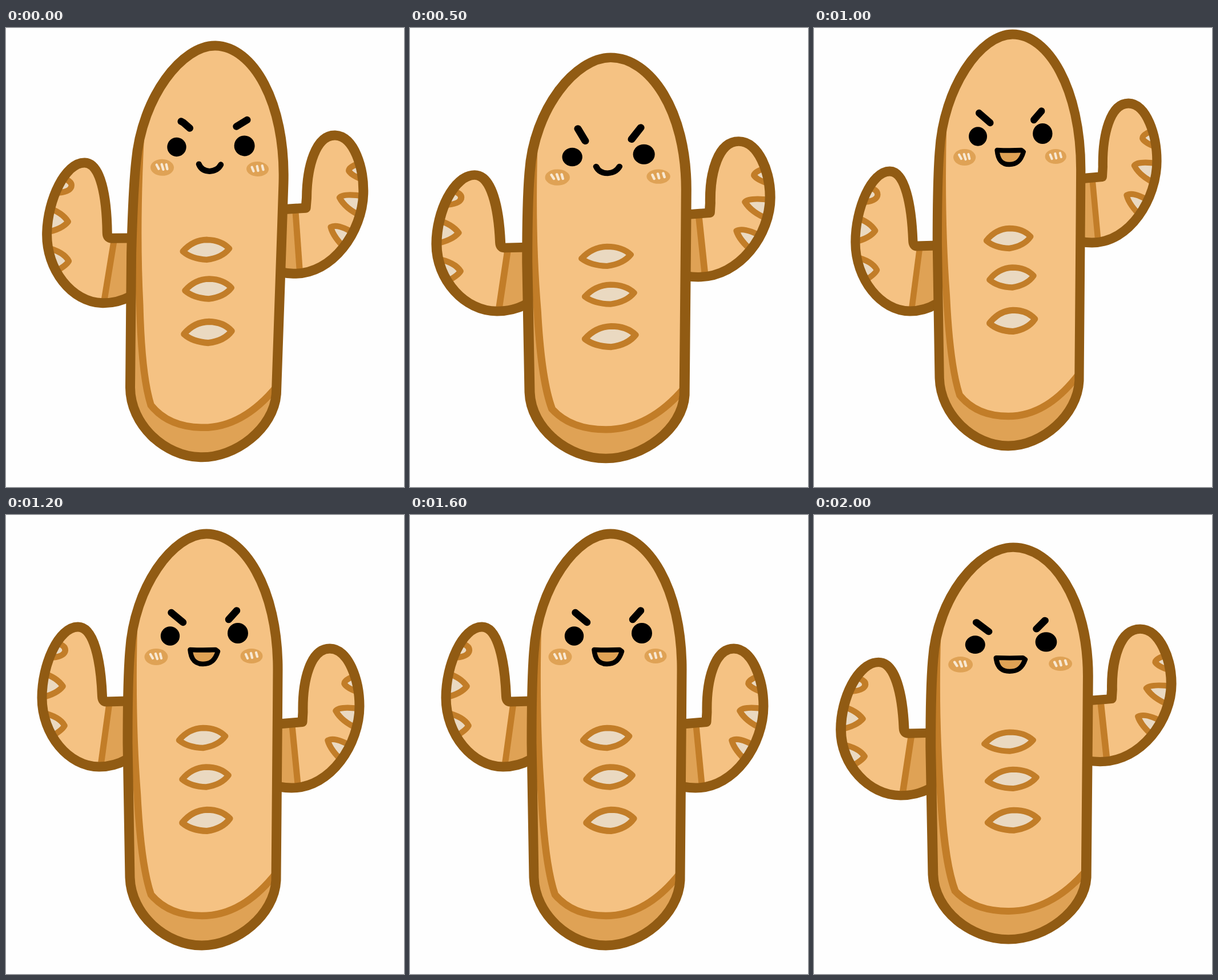
These frames come from a looping animation (697 px wide and 804 px high, 2.1 s). An HTML page:

```html
<!DOCTYPE html>
<html lang="en">
<head>
<meta charset="utf-8">
<title>Dancing bread</title>
<style>
html, body { margin: 0; width: 100%; height: 100%; overflow: hidden; background: #fefefe; }
svg { display: block; width: 100vw; height: 100vh; }
.line { fill: none; stroke: #915b13; stroke-width: 17; stroke-linejoin: round; }
.crust { fill: #f5c283; }
.shade { fill: #dfa255; }
.fold { fill: none; stroke: #c27d28; stroke-width: 11; }
.cut { fill: #ead9c1; stroke: #c27d28; stroke-width: 10.5; stroke-linejoin: round; }
.ink { fill: none; stroke: #000; stroke-width: 12.5; stroke-linecap: round; stroke-linejoin: round; }
.glow { fill: none; stroke: #f8e8d2; stroke-width: 4.3; stroke-linecap: round; }
</style>
</head>
<body>
<svg viewBox="0 0 697 804">
  <defs>
    <path id="bodyShape" d="M351 33C416 33 476 128 476 270L475.5 345L473 640C470 700 405 754 343 754C280 754 219 700 217 635L213 400C213 350 213 290 217 240C224 125 293 33 351 33Z"/>
    <path id="leftShape" d="M212 326L176 327Q169 327 168.500 318C166 255 154 196 126 196C92 196 63 262 63 320C63 385 110 441 163 441C182 441 196 437 212 428"/>
    <path id="rightShape" d="M478 366L519 362.500L520 345C519 290 533 234 567 234C600 234 619 290 619 335C619 400 570 478 500 478Q490 478 478 476"/>
    <path id="slash" class="cut" d="M303 394.500Q320 374 345 373Q370 373 384 387.500Q372 404 345 408Q318 407 303 394.500Z"/>
    <clipPath id="bodyClip"><use href="#bodyShape"/></clipPath>
    <clipPath id="leftClip"><use href="#leftShape"/></clipPath>
    <clipPath id="rightClip"><use href="#rightShape"/></clipPath>
  </defs>

  <g id="left">
    <use href="#leftShape" class="crust"/>
    <g clip-path="url(#leftClip)">
      <path class="shade" d="M182 320L166 450H220V320Z"/>
      <path class="fold" d="M182 322L165 446"/>
      <path class="cut" d="M88 224Q106 229 103.500 239Q100 249 76 250"/>
      <path class="cut" d="M62 276Q89 284 99.500 300Q89 314 60 320"/>
      <path class="cut" d="M62 346Q94 353 102.500 369Q98 378 74 391"/>
    </g>
    <use href="#leftShape" class="line"/>
  </g>

  <g id="right">
    <use href="#rightShape" class="crust"/>
    <g clip-path="url(#rightClip)">
      <path class="shade" d="M500 355L512 485H470V355Z"/>
      <path class="fold" d="M500 358L512 482"/>
      <path class="cut" d="M614 281Q592 288 592.500 295.500Q597 304 622 312"/>
      <path class="cut" d="M624 340Q584 334 577.500 343Q588 362 616 374"/>
      <path class="cut" d="M610 408Q576 387 563.500 395Q568 412 592 434"/>
    </g>
    <use href="#rightShape" class="line"/>
  </g>

  <g id="body">
    <use href="#bodyShape" class="shade"/>
    <g clip-path="url(#bodyClip)">
      <path class="crust" d="M224 190C221 300 223 400 230 490C234 570 242 630 254 665Q285 702 343 702Q415 702 474 626H500V0H224Z"/>
      <path class="fold" style="stroke-width:12.5" d="M224 190C221 300 223 400 230 490C234 570 242 630 254 665Q285 702 343 702Q415 702 474 626"/>
    </g>
    <use href="#bodyShape" class="line"/>

    <use href="#slash"/>
    <use href="#slash" x="5.500" y="68.500"/>
    <use href="#slash" transform="translate(-3.500 119) scale(1.03 1.065)"/>

    <ellipse class="shade" cx="263" cy="248.500" rx="20.500" ry="14.500"/>
    <ellipse class="shade" cx="430" cy="247" rx="19.500" ry="13"/>
    <path class="glow" d="M253 244l4 7M262 243l3 9M270 243l2 8M420 244l3 7M429 242l2 8M438 241l2 7"/>

    <circle cx="287.500" cy="212" r="16.700"/>
    <circle cx="406" cy="207" r="18"/>
    <path id="brows" class="ink"/>
    <path id="smile" class="ink" style="stroke-width:10" d="M327 241Q332 253 346 253Q360 252 365.500 241"/>
    <path id="laugh" class="ink" style="stroke-width:8.500;fill:#dfa255" d="M322.500 236Q346 237 367 236L371 239C366 255 358 261 345 261C330 261 324 252 322.500 236Z"/>
  </g>
</svg>

<script>
const STEP = 100, HOLD = 300, LOOP = 2100;

const BROWS = {
  calm: "M294 167L298 169L309.500 178.500M409.500 161.500L391 173.500",
  fierce: "M296.800 161L309 183M400.700 159L385.600 180",
  happy: "M289.500 171L310 188M404 167.500L390 183"
};

const SQUASH = [1.059, 0, 0, .974, -20.3, 19.6];
const LANDED = [1.048, 0, 0, .9526, -19, 25.2];

// m: body matrix, l / r: arm heights, dx: right arm inset
const pose = (m, l, r, dx, brows = "happy", smileY = null) => ({ m, l, r, dx, brows, smileY });

const P = {
  idle: pose([1, .025, -.026, 1, 17, -10.75], 47.5, -49.5, -1.5, "calm", 0),
  dip: pose([1.03, .012, -.01, .98, -2, 9], 47, -49, -4, "calm", -5),
  deep: pose([1.075, 0, 0, .955, -26, 34], 47, -49, -3, "fierce", -12),
  crouch: pose(SQUASH, 47, -49, -4.5, "fierce", -12),
  jump: pose([.956, 0, 0, 1, 12.2, -22], 77, -80, -3.5),
  land: pose(LANDED, 46, -48.5, -4),
  stand: pose([1, 0, 0, 1, 0, 0], 0, 0, 0),
  sink: pose(SQUASH, 23, -24, -1),
  settle: pose(SQUASH, 47, -49, -4.5)
};

const order = ["idle", "dip", "deep", "crouch"];
for (let i = 0; i < 3; i++) order.push("jump", "land", "stand", "sink");
order.push("jump", "settle", "land");

const $ = id => document.getElementById(id);
const set = (id, key, val) => $(id).setAttribute(key, val);

function draw(name) {
  const p = P[name], m = `matrix(${p.m})`;
  set("body", "transform", m);
  set("left", "transform", `translate(0 ${p.l}) ${m}`);
  set("right", "transform", `translate(${p.dx} ${p.r}) ${m}`);
  set("brows", "d", BROWS[p.brows]);
  const smiling = p.smileY !== null;
  set("smile", "visibility", smiling ? "visible" : "hidden");
  set("laugh", "visibility", smiling ? "hidden" : "visible");
  if (smiling) set("smile", "transform", `translate(0 ${p.smileY})`);
}

let start = null;
function tick(now) {
  if (start === null) start = now;
  const t = (now - start) % LOOP;
  const i = t < HOLD ? 0 : 1 + Math.floor((t - HOLD) / STEP);
  draw(order[i]);
  requestAnimationFrame(tick);
}
draw("idle");
requestAnimationFrame(tick);
</script>
</body>
</html>
```
